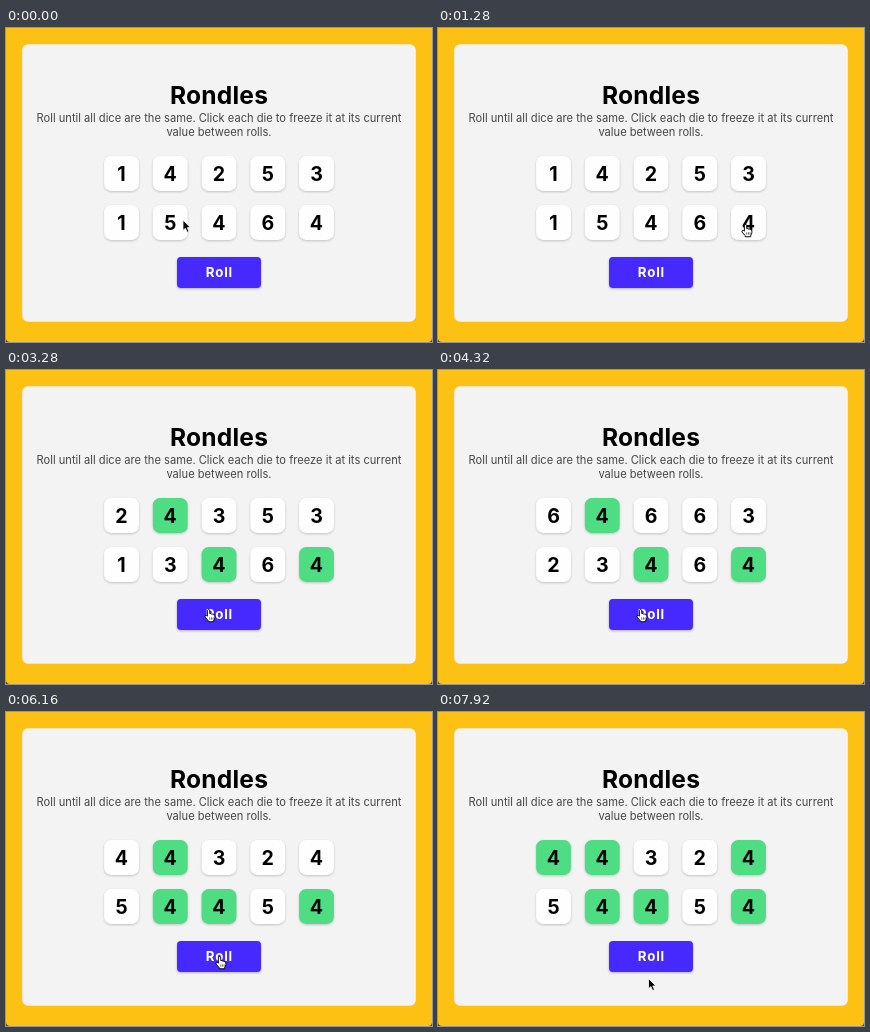
Animation of 426x314 px, one loop 8000 ms. Source, as an HTML page:

```html
<!DOCTYPE html>
<html lang="en">
<head>
<meta charset="utf-8">
<title>Dice game</title>
<style>
  html, body { margin: 0; width: 100%; height: 100%; overflow: hidden; background: #3d4424; }
  svg { display: block; width: 426px; height: 314px; }
  text { font-family: Inter, Roboto, sans-serif; text-anchor: middle; }
  .title { font-size: 24.6px; font-weight: 700; letter-spacing: .2px; }
  .hint { font-size: 11.13px; fill: #454545; }
  .die { fill: #fefefe; filter: drop-shadow(0 1.2px 1px rgba(0, 0, 0, .2)); }
  .die.held { fill: #4fdd83; }
  .digit { font-size: 19.6px; font-weight: 700; }
  .button { fill: #4529ff; filter: drop-shadow(0 1.2px 1px rgba(0, 0, 0, .28)); }
  .label { font-size: 13.3px; font-weight: 700; letter-spacing: .8px; fill: #fff; }
</style>
</head>
<body>
<svg viewBox="0 0 426 314">
  <path d="M0 0H426V310Q426 314 422 314H4Q0 314 0 310Z" fill="#fcc113"/>
  <rect x="16.2" y="16.2" width="393.6" height="277.6" rx="6" fill="#f3f3f3"/>
  <text class="title" x="213" y="76">Rondles</text>
  <text class="hint" x="213" y="94.2">Roll until all dice are the same. Click each die to freeze it at its current</text>
  <text class="hint" x="213" y="108.2">value between rolls.</text>
  <g id="dice"></g>
  <rect class="button" x="171" y="229" width="84" height="31" rx="4"/>
  <text class="label" x="213.4" y="249">Roll</text>
  <g id="cursor" stroke-linejoin="round">
    <path id="arrow" d="M0 0V10.2L2.4 8.1L4.1 12L6 11.2L4.3 7.4H7.4Z" fill="#000" stroke="#fff" stroke-width=".8"/>
    <g id="hand" transform="scale(.95)" fill="#fff" stroke="#000">
      <path d="M-1.7 7V1.2Q-1.5 0 -.4 0Q.7 0 .8 1.2V4.4Q2.2 3.6 2.9 4.9Q4.2 4.3 4.7 5.5Q6.2 5.2 6.2 6.8V8.4Q6 10.3 5 11.2V12.9H-.8V11.8L-4.1 8Q-4.8 6.4 -3.5 6.2Q-2.6 6.1 -1.7 7Z"/>
      <path d="M.8 8.2V10.7M2.6 8.2V10.7M4.3 8.2V10.7" stroke-width=".6"/>
    </g>
  </g>
</svg>
<script>
const LOOP = 8000, TICK = 80, SIZE = 34.8;
const LINGER = 80, SETTLE = 160;  // pauses after and before each click

const byId = id => document.getElementById(id);
const cursor = byId("cursor"), arrow = byId("arrow"), hand = byId("hand");

function add(tag, attributes) {
  const node = document.createElementNS("http://www.w3.org/2000/svg", tag);
  for (const key in attributes) node.setAttribute(key, attributes[key]);
  return byId("dice").appendChild(node);
}

const dice = Array.from({ length: 10 }, (_, i) => {
  const x = 213 + (i % 5 - 2) * 48.75, y = i < 5 ? 145.5 : 194.5;
  return {
    x, y, width: SIZE, height: SIZE,
    face: add("rect", {
      class: "die", x: x - SIZE / 2, y: y - SIZE / 2, width: SIZE, height: SIZE, rx: 7
    }),
    digit: add("text", { class: "digit", x, y: y + 7.3 })
  };
});
const button = { x: 213, y: 244.5, width: 84, height: 31 };
const targets = [...dice, button];

// Every action aims the pointer at an offset from its target's centre.
const move = (at, target, dx, dy) => ({ at, x: target.x + dx, y: target.y + dy });
const hold = (at, index, dx = -2.5, dy = 2) => ({ ...move(at, dice[index], dx, dy), index });
const roll = (at, faces, dx = -10, dy = -5) =>
  ({ ...move(at, button, dx, dy), faces: faces || randomFaces(at) });

// Repeatable dice for the rolls that pass by quickly.
const randomFaces = seed => dice.map((_, i) => {
  const noise = Math.abs(Math.sin(seed + i * 12.9898) * 43758.5453);
  return 1 + Math.floor(noise % 1 * 6);
});

const firstFaces = "1425315464";
const actions = [
  move(-LINGER, dice[6], 12.75, -2.3),
  hold(1440, 9),
  hold(1840, 7),
  hold(2320, 1, -3, 9),
  roll(3120, "2435313464"),
  roll(3840),
  roll(4480),
  roll(4960, "2465364464"),
  hold(5760, 6, -6, 8),
  roll(6160, "4432454454", 1, 0),
  hold(6880, 4),
  hold(7360, 0),
  move(LOOP + LINGER, button, -2.5, 22)
];

function gameAt(time) {
  const held = new Set();
  let values = [...firstFaces];
  for (const { at, index, faces } of actions) {
    if (at > time) break;
    if (index !== undefined) held.add(index);
    if (faces) values = values.map((value, i) => held.has(i) ? value : faces[i]);
  }
  return { values, held };
}

function pointerAt(time) {
  const next = actions.findIndex(action => action.at + LINGER > time);
  const from = actions[next - 1], to = actions[next];
  const begin = from.at + LINGER, end = to.at - SETTLE;
  const p = Math.min(1, (time - begin) / (end - begin));
  const eased = p * p * (3 - 2 * p);
  return [from.x + (to.x - from.x) * eased, from.y + (to.y - from.y) * eased];
}

// The pointer turns into a hand a little inside the side edges.
const isOver = (x, y) => targets.some(box =>
  Math.abs(x - box.x) < box.width / 2 - 6 && Math.abs(y - box.y) < box.height / 2);

function draw(time) {
  const { values, held } = gameAt(time);
  dice.forEach(({ face, digit }, i) => {
    digit.textContent = values[i];
    face.classList.toggle("held", held.has(i));
  });
  const [x, y] = pointerAt(time), over = isOver(x, y);
  cursor.setAttribute("transform", `translate(${x} ${y})`);
  arrow.style.display = over ? "none" : "";
  hand.style.display = over ? "" : "none";
}

const start = performance.now();
function frame() {
  const time = (performance.now() - start) % LOOP;
  draw(Math.floor(time / TICK) * TICK);
  requestAnimationFrame(frame);
}
frame();
</script>
</body>
</html>
```
